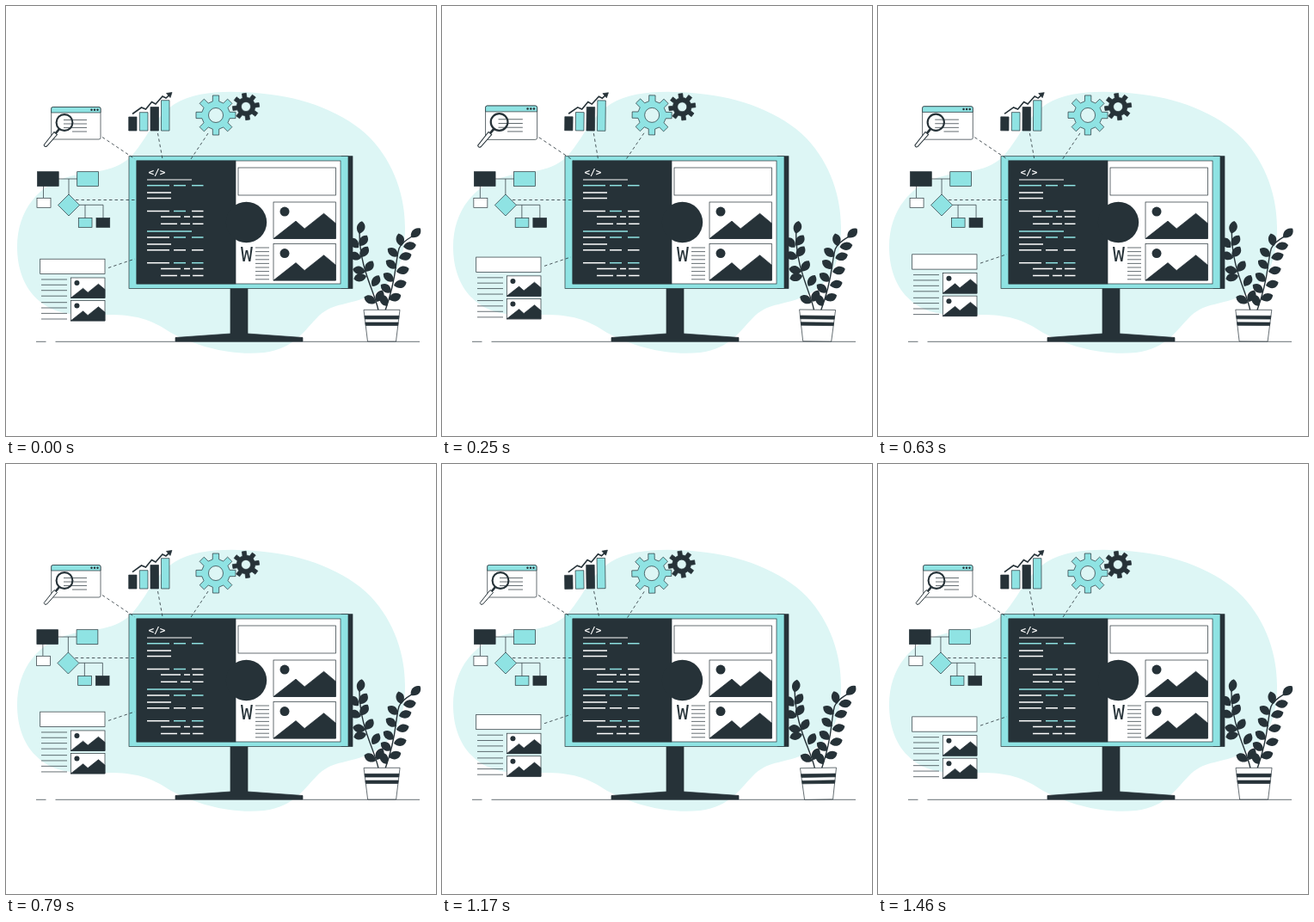
Recreate the animation shown at these times as an HTML page. Size 500 px wide and 500 px high, loop 1.5 s.

```html
<!DOCTYPE html>
<html lang="en">
<head>
<meta charset="utf-8">
<title>Web development</title>
<style>
  html, body { margin: 0; height: 100%; overflow: hidden; background: #fff; }
  svg { display: block; width: 100vw; height: 100vh; }
  .mono { font-family: "DejaVu Sans Mono", monospace; }
</style>
</head>
<body>
<svg id="stage" viewBox="0 0 500 500"></svg>
<script>
const DARK = '#263238', TEAL = '#8fe3e3', PALE = '#ddf6f5', WHITE = '#fff';
const LOOP = 1500;

const path = (d, fill = 'none', stroke = DARK, width = 0.7, extra = '') =>
  `<path d="${d}" fill="${fill}" stroke="${stroke}" stroke-width="${width}" ${extra}/>`;
const box = (x1, y1, x2, y2, fill, rx = 0) =>
  `<rect x="${x1}" y="${y1}" width="${x2 - x1}" height="${y2 - y1}" rx="${rx}" fill="${fill}" stroke="${DARK}" stroke-width=".7"/>`;
const dot = (x, y, r, fill = DARK) => `<circle cx="${x}" cy="${y}" r="${r}" fill="${fill}"/>`;
const rows = (x1, x2, ys) => path(ys.map(y => `M${x1} ${y}H${x2}`).join(''));
const dashes = d => path(d, 'none', DARK, 0.8, 'stroke-dasharray="3.5 3"');
const group = (id, body) => `<g id="${id}">${body}</g>`;

function picture(x, y, w, h) {
  const peaks = [[0, 1], [.36, .52], [.5, .73], [.81, .31], [1, .58], [1, 1]];
  const ridge = peaks.map(([u, v]) => `${x + u * w} ${y + v * h}`).join('L');
  return box(x, y, x + w, y + h, WHITE) + dot(x + .18 * w, y + .26 * h, .076 * w) + path(`M${ridge}Z`, DARK);
}

function gear(cx, cy, outer, inner, hole, turn, fill) {
  const points = [];
  for (let i = 0; i < 8; i++) {
    for (const [r, a] of [[inner, -13], [outer, -9], [outer, 9], [inner, 13]]) {
      const angle = (i * 45 + turn + a) * Math.PI / 180;
      points.push(`${(cx + r * Math.cos(angle)).toFixed(2)} ${(cy + r * Math.sin(angle)).toFixed(2)}`);
    }
  }
  const ring = `M${cx - hole} ${cy}a${hole} ${hole} 0 1 0 ${2 * hole} 0a${hole} ${hole} 0 1 0 ${-2 * hole} 0Z`;
  return path(`M${points.join('L')}Z${ring}`, fill, DARK, 0.7, 'fill-rule="evenodd" stroke-linejoin="round"');
}

function codeLines() {
  const full = [[164, 190], [195, 209], [216, 229.5]];
  const inner = [[180, 203], [207, 214], [217, 229.5]];
  const inner2 = [[180, 199], [203, 214], [217, 229.5]];
  const short = [[164, 192]], wide = [[164, 216]];
  const lines = [
    [202, wide, 'w'], [208.7, full, 'ttt'], [217, short, 'w'], [223.5, short, 'w'],
    [238.5, full, 'wtw'], [245, inner, 'www'], [253.3, inner2, 'www'], [262, wide, 't'],
    [269, full, 'wtt'], [277, short, 'w'], [283.8, full, 'www'],
    [298.7, full, 'wtt'], [305.5, inner, 'www'], [313.5, inner2, 'www']
  ];
  return lines.map(([y, spans, tones]) => spans.map(([a, b], i) =>
    path(`M${a} ${y}H${b}`, 'none', tones[i] === 't' ? TEAL : WHITE, y === 202 ? 1 : 1.5)).join('')).join('');
}

function plant() {
  const leaves = [
    [411, 265, -75], [411, 279, -50], [412, 292, -50], [418, 309, -52], [426, 326, -55], [431, 344, -60],
    [410, 281, -130], [413, 293, -160], [418, 309, -165], [419, 314, -190], [430, 345, -150],
    [471, 269, -40], [462, 280, -5], [457, 293, -12], [454, 309, -10], [451, 325, -10], [445, 341, -15],
    [460, 279, -100], [456, 291, -140], [454, 305, -140], [451, 320, -140], [448, 333, -140], [443, 349, -115]
  ];
  return path('M433 354C428 330 411 306 411 262M441 354C455 315 452 300 457 282Q460 275 472 268', 'none', DARK, 1.4) +
    leaves.map(([x, y, a]) =>
      `<path transform="translate(${x} ${y}) rotate(${a})" d="M0 0C3-6 11-7 15-1C12 6 5 6 0 0" fill="${DARK}"/>`).join('') +
    path('M416 353.3H458L453.5 390H420.5Z', WHITE) +
    path('M417 360.3H457L456.6 364H417.4ZM417.9 368H456.1L455.7 371.5H418.3Z', DARK);
}

const monitor =
  path('M261 328H281V381L345 385.5V390H197V385.5L261 381Z', DARK) +
  box(390, 174.7, 403, 328.5, DARK) + box(143, 174.7, 398, 328.5, TEAL) +
  box(152, 180, 389, 323, WHITE) + box(152, 180, 267, 323, DARK) + dot(279.5, 251.5, 23.7) +
  `<text class="mono" x="165.5" y="196.5" font-size="11" font-weight="bold" fill="${WHITE}">&lt;/&gt;</text>` +
  codeLines() + box(270, 188, 383.5, 220, WHITE) +
  picture(311, 228, 72.3, 42.5) + picture(311, 276.5, 72.3, 42.5) +
  `<text class="mono" x="273" y="297" font-size="23" fill="${DARK}">W</text>` +
  rows(290, 306, [281, 285.6, 290.2, 294.8, 299.4, 304, 308.6, 313.2, 317.8]);

const search =
  box(52.7, 117.5, 110, 155, WHITE, 2) + path('M52.7 124V119.5q0-2 2-2H108q2 0 2 2V124Z', TEAL) +
  dot(99.5, 120.7, 1.2) + dot(103, 120.7, 1.2) + dot(106.5, 120.7, 1.2) +
  rows(67, 94, [132.5, 137, 141.5]) + rows(77, 94, [146]) +
  `<circle cx="68" cy="135.5" r="9.4" fill="none" stroke="${DARK}" stroke-width="2.1"/>` +
  path('M62 143L57 149', 'none', DARK, 2.6) +
  path('M56 146.5L59.5 149.5L47.5 163Q45 164.5 44.2 161.5Z', WHITE, DARK, 1) +
  dashes('M112 152.5L150 178');

const chart =
  box(142.7, 129, 152, 145, DARK) + box(155.3, 123.7, 165, 145, TEAL) +
  box(168, 117.5, 177.5, 145, DARK) + box(180.5, 109.7, 190, 145, TEAL) +
  path('M147 125.5L157.5 118L162.5 120L169.5 111.5L174 114L182 105L186 107L191 102.5', 'none', DARK, 1.6) +
  path('M186.5 101.5L193 100.5L191 106.5Z', DARK) + dashes('M176.5 148L182 178');

const gears = gear(244, 127, 23.3, 16.5, 8.5, 0, TEAL) + gear(279, 117, 15.7, 10.8, 5.5, -8, DARK) +
  dashes('M235 148L215 178');

const flow =
  path('M61 201H83M73 201V220M43.5 209V223M85 231.3H113V247M92 231.3V247') +
  box(36.5, 192.7, 61.2, 209.5, DARK) + box(82.7, 192.7, 107.5, 209.5, TEAL) +
  path('M73 219L85.5 231.5L73 244L60.5 231.5Z', TEAL) +
  box(36, 223.3, 52, 234.3, WHITE) + box(84.3, 246.5, 100, 257.3, TEAL) + box(105, 246.5, 120.7, 257.3, DARK) +
  dashes('M81 225.5H150');

const article =
  box(39.7, 294.2, 115, 311.5, WHITE) + rows(41, 71, [318, 324.3, 330.7, 337.2, 344.7, 351, 357.4, 364]) +
  picture(75.3, 316, 39.7, 23.5) + picture(75.3, 342.5, 39.7, 23.5) + dashes('M119 304.5L150 294');

const stage = document.getElementById('stage');
stage.innerHTML =
  path('M13 280C13 238 38 207 75 198C100 191 128 195 148 172C165 152 172 130 196 114C222 98 262 98 300 102C345 106 395 124 424 154C452 184 464 222 464 258C464 298 452 322 425 336C398 349 382 344 364 360C346 378 336 398 300 403C262 407 222 396 192 380C168 364 150 359 120 359C90 359 62 362 40 344C20 328 13 304 13 280Z', PALE, 'none') +
  path('M35 390.3H46.5M57.5 390.3H481') +
  group('plant', plant()) + monitor + group('search', search) + group('chart', chart) +
  group('gears', gears) + group('flow', flow) + group('article', article);

const linear = u => u;
const snap = u => { const v = u ** 0.7; return v * v * (3 - 2 * v); };

// Interpolates [position, value] keys at p in 0..1
function keyed(keys, p, ease = linear) {
  const i = Math.max(1, keys.findIndex(k => k[0] >= p));
  const [a, from] = keys[i - 1], [b, to] = keys[i];
  return from + (to - from) * ease((p - a) / (b - a));
}

const beat = [[0, 1], [.1, 1.1], [.23, 1], [.33, 1.1], [.45, 1], [1, 1]];
const sway = [[0, 0], [.25, 1], [.75, -1], [1, 0]];
const lift = [[0, 0], [.5, -6.4], [1, 0]];
const shake = [0, -.5, 1.1, -2.2, 2.2, -2.2, 2.2, -2.2, 1.1, -.5, 0].map((x, i) => [i / 10, x]);

const move = (id, value) => document.getElementById(id).setAttribute('transform', value);

function draw(now) {
  const p = now % LOOP / LOOP;
  const angle = keyed(sway, p);
  move('search', `translate(97 147.5) scale(${keyed(beat, p)}) translate(-97 -147.5)`);
  move('chart', `rotate(${angle} 168 139)`);
  move('gears', `rotate(${angle} 255 139)`);
  move('plant', `rotate(${angle} 443 320)`);
  move('flow', `translate(${keyed(shake, p, snap)} 0)`);
  move('article', `translate(0 ${keyed(lift, p)})`);
  requestAnimationFrame(draw);
}
draw(performance.now());
</script>
</body>
</html>
```
